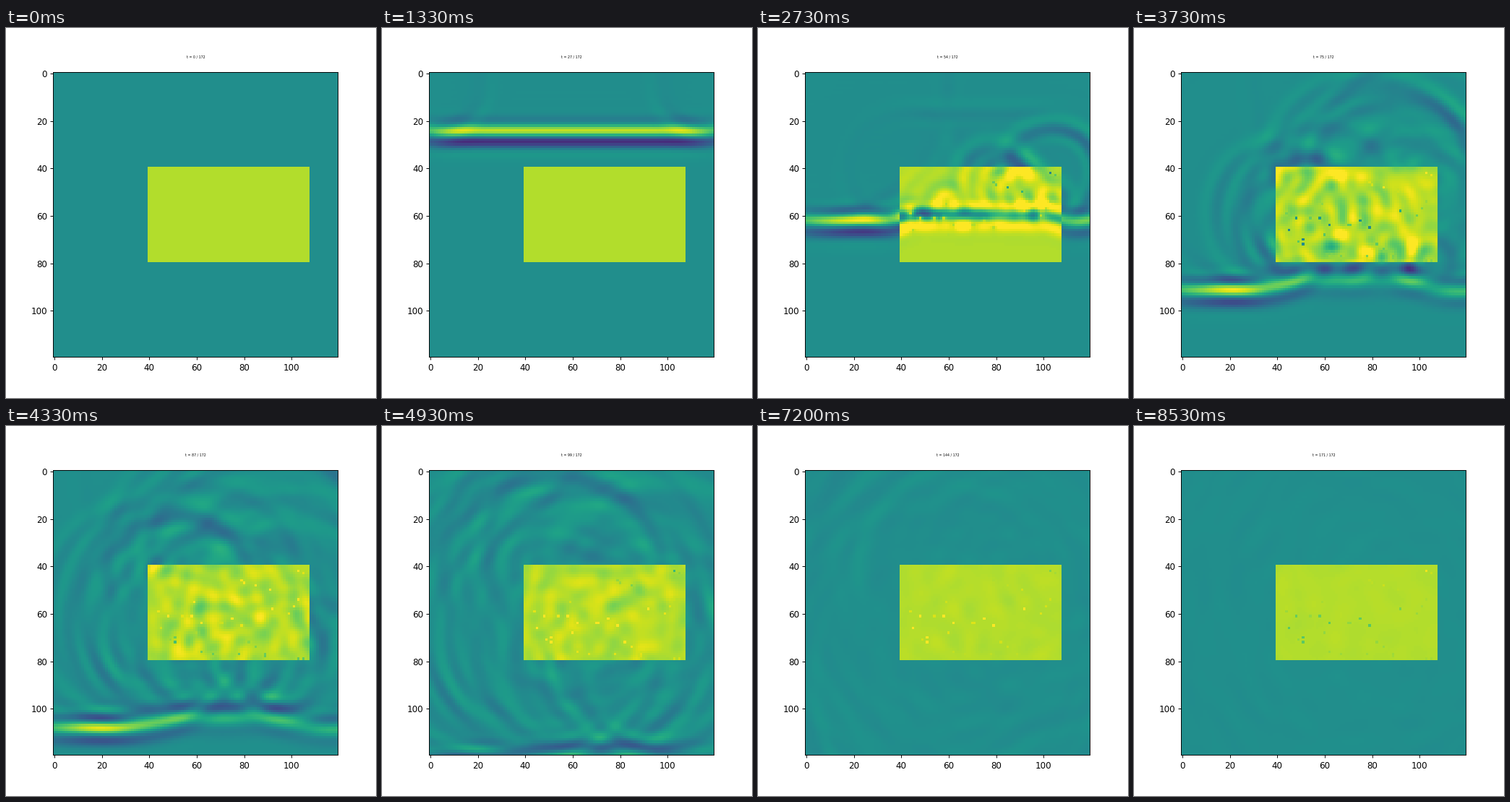
These frames come from a looping animation (512 px wide and 512 px high, 8.74 s). A matplotlib script:

```python
import numpy as np
import matplotlib.pyplot as plt
from matplotlib.animation import FuncAnimation

SIZE = 512
N, PAD = 120, 30            # visible cells, absorbing margin
STEPS, STRIDE = 172, 3      # simulated time, time shown per picture
LOOP_MS, FRAMES = 8740, 230
INTERVAL = LOOP_MS // FRAMES

COURANT, SUBSTEPS = 0.706, 2
SPEED = COURANT * SUBSTEPS  # cells per time unit
PULSE_T, PULSE_LEN, PULSE_WIDTH, PULSE_AMP = 8.0, 11.8, 3.8, 0.5
BLOCK = (slice(40, 80), slice(40, 108))
BACK, BLOCK_BASE = 0.495, 0.886
SLOWNESS, VISCOSITY = 0.89, 0.02
GRAIN_MASS, GRAIN_PERIOD, GRAIN_DECAY = 150, 48, 90

# heavy grains: a few strong ones (column, row), the rest scattered
STRONG = [(58, 61), (48, 61), (45, 66), (51, 70), (51, 72), (62, 64),
          (75, 62), (79, 65), (85, 48), (91, 50), (92, 58), (103, 42)]
rng = np.random.default_rng(4)
weak = rng.integers((40, 40), (108, 80), size=(22, 2))
COL, ROW = np.vstack([STRONG, weak]).T
SWING = np.where(np.arange(len(COL)) < len(STRONG), 0.42, 0.14)
ARRIVAL = PULSE_T + ROW / (0.95 * SPEED)


def pulse(t):
    s = SPEED * (t - PULSE_T)
    wave = np.sin(2 * np.pi * s / PULSE_LEN)
    return PULSE_AMP * wave * np.exp(-s * s / (2 * PULSE_WIDTH ** 2))


def laplacian(u):
    return (np.roll(u, 1, 0) + np.roll(u, -1, 0)
            + np.roll(u, 1, 1) + np.roll(u, -1, 1) - 4 * u)


def margin_damping(size):
    i = np.arange(size)
    depth = np.clip(np.maximum(PAD - i, i - (size - 1 - PAD)), 0, None) / PAD
    return 0.2 * np.maximum(depth[:, None], depth[None, :]) ** 2


def simulate():
    """Wave field of the visible cells for every picture."""
    size = N + 2 * PAD
    view = (slice(PAD, PAD + N), slice(PAD, PAD + N))
    c2 = np.full((size, size), COURANT ** 2)
    c2[view][BLOCK] *= SLOWNESS ** 2
    c2[view][ROW, COL] = (COURANT * SLOWNESS) ** 2 / GRAIN_MASS
    loss = np.zeros((size, size))
    loss[view][BLOCK] = VISCOSITY
    loss[view][ROW, COL] = 0
    damp = margin_damping(size)

    u, old = np.zeros((size, size)), np.zeros((size, size))
    lap = np.zeros((size, size))
    fields = []
    for n in range(STEPS * SUBSTEPS):
        t = n / SUBSTEPS
        if n % (STRIDE * SUBSTEPS) == 0:
            fields.append(u[view].copy())
        last, lap = lap, laplacian(u)
        force = c2 * lap + loss * (lap - last)
        new = (2 * u - (1 - damp) * old + force) / (1 + damp)
        if t < 2 * PULSE_T:
            new[PAD, PAD:PAD + N] = pulse(t + 1 / SUBSTEPS)
        old, u = u, new
    return fields


def grain_values(t):
    """Slow ringing of each grain after the wave front has reached it."""
    age = t - ARRIVAL
    onset = np.clip(age / 6, 0, 1)
    ring = np.cos(2 * np.pi * (age - 17) / GRAIN_PERIOD)
    return onset * SWING * ring * np.exp(-(age - 20) / GRAIN_DECAY)


def picture(field, t):
    image = BACK + field
    image[BLOCK] = BLOCK_BASE - field[BLOCK]
    image[ROW, COL] = BLOCK_BASE - grain_values(t)
    return np.clip(image, 0, 1)


pictures = [picture(f, k * STRIDE) for k, f in enumerate(simulate())]

# pictures follow every 150 ms, snapped to a 15 Hz clock
ticks = np.floor(2.25 * np.arange(len(pictures)) + 0.5)
starts = np.floor(ticks * 200 / 3 / 10) * 10

plt.rcParams["font.family"] = "DejaVu Sans"
fig = plt.figure(figsize=(6, 6), dpi=SIZE / 6)
ax = fig.add_axes([65.4 / SIZE, 56.6 / SIZE, 394 / SIZE, 394 / SIZE])
im = ax.imshow(pictures[0], cmap="viridis", vmin=0, vmax=1)
ax.set_xticks(range(0, N, 20))
ax.set_yticks(range(0, N, 20))
title = ax.set_title("", fontsize=4, pad=16.5)


def draw(i):
    now = (i + 1) * INTERVAL - 1
    k = np.searchsorted(starts, now, side="right") - 1
    im.set_data(pictures[k])
    title.set_text(f"t = {k * STRIDE} / {STEPS}")
    return im, title


anim = FuncAnimation(fig, draw, frames=FRAMES, interval=INTERVAL,
                     repeat=True, repeat_delay=0, cache_frame_data=False)
plt.show()
```
